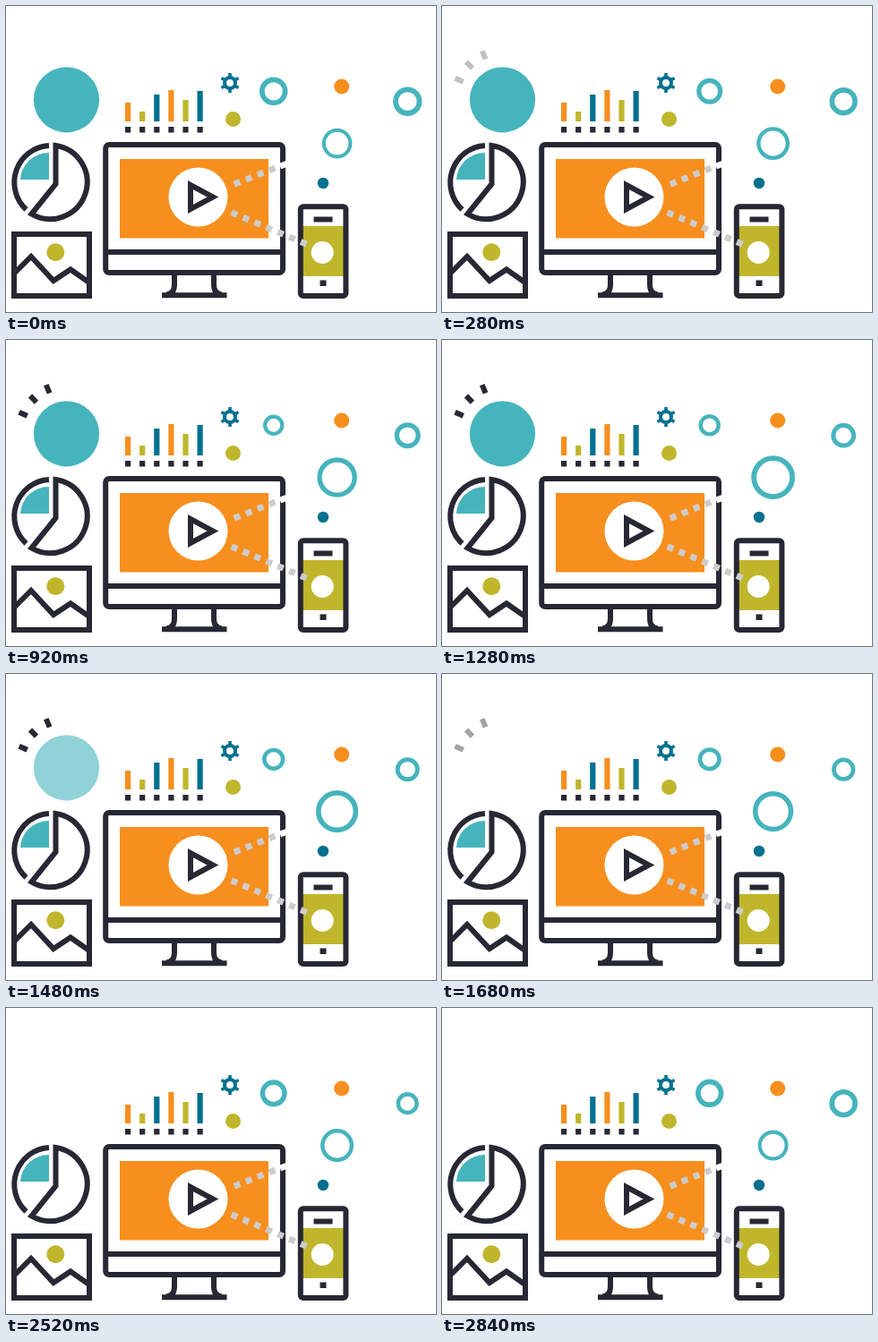
An HTML page for the animation above (2.88 s loop, 480 by 342 pixels).

```html
<!DOCTYPE html>
<html lang="en">
<head>
<meta charset="utf-8">
<title>Media devices</title>
<style>
  html, body { margin: 0; width: 100%; height: 100%; overflow: hidden; background: #fff; }
  svg { display: block; width: 100vw; height: 100vh; }
  .line { fill: none; stroke: var(--ink); stroke-width: 6; }
  .dots { fill: none; stroke: #ccc; stroke-width: 7; stroke-dasharray: 7 7; }
  .ring { fill: none; stroke: var(--teal); }
  svg { --ink: #272833; --teal: #46b4bd; --orange: #f78f1e; --olive: #c0b62c; --blue: #00708f; }
  .ink { fill: var(--ink); } .teal { fill: var(--teal); } .orange { fill: var(--orange); }
  .olive { fill: var(--olive); } .blue { fill: var(--blue); } .white { fill: #fff; }
</style>
</head>
<body>
<svg id="stage" viewBox="0 0 480 342">
  <!-- badge -->
  <circle id="badge" class="teal" cx="67.5" cy="104.8" r="36.6"/>
  <g id="sparks" class="ink"></g>

  <!-- bar chart and gear -->
  <g id="bars"></g>
  <g id="gear" stroke="var(--blue)" fill="none">
    <circle cx="250" cy="86" r="6" stroke-width="4"/>
  </g>

  <!-- loose dots -->
  <circle class="olive" cx="253.5" cy="126.5" r="8.5"/>
  <circle class="orange" cx="374.7" cy="90" r="8.5"/>
  <circle class="blue" cx="354" cy="198" r="6.2"/>

  <!-- pie chart -->
  <path class="teal" d="M48 164V194H16A32 31 0 0 1 48 164Z"/>
  <path class="line" d="M48 156A41.3 41.3 0 0 0 22.5 227.5"/>
  <path class="line" d="M55.5 156V199L28.5 232.5A41.3 41.3 0 1 0 55.5 156Z"/>

  <!-- picture -->
  <circle class="olive" cx="55.3" cy="275.3" r="10"/>
  <path class="line" d="M10 298L28 280L53 307L72 294.5L92 308.5"/>
  <rect class="line" x="9" y="255" width="84" height="69"/>

  <!-- monitor -->
  <rect class="line" x="111.2" y="155" width="197.8" height="143" rx="4"/>
  <path class="line" d="M111 275H309M188 300V311Q188 322 179 322.5M232 300V311Q232 322 241 322.5M174 323.3H246.5"/>
  <rect class="orange" x="127" y="171" width="166" height="88.5"/>
  <circle class="white" cx="214.5" cy="213.5" r="33"/>
  <path class="line" d="M206 200V227L231 213.5Z"/>

  <!-- phone -->
  <rect class="olive" x="330" y="246" width="49" height="56"/>
  <rect class="line" x="328.8" y="224.2" width="50.6" height="99.8" rx="3"/>
  <rect class="ink" x="343.5" y="235.5" width="21" height="6"/>
  <rect class="ink" x="350.5" y="306.5" width="7" height="6.5"/>
  <circle class="white" cx="353.2" cy="275.5" r="12.5"/>

  <!-- links -->
  <path class="dots" d="M254.8 199.2L300.5 181"/>
  <path d="M306 179L313 176.5" stroke="#fff" stroke-width="7"/>
  <path class="dots" d="M251.7 230.7L336 266.5"/>
</svg>
<script>
const LOOP = 2880, STEP = 40;
const $ = id => document.getElementById(id);

function add(parent, tag, attrs) {
  const el = document.createElementNS('http://www.w3.org/2000/svg', tag);
  for (const key in attrs) el.setAttribute(key, attrs[key]);
  parent.appendChild(el);
  return el;
}

// Bars: [top, colour]
[[108, 'orange'], [118, 'olive'], [99, 'blue'], [94, 'orange'], [105, 'olive'], [95, 'blue']]
  .forEach(([top, color], i) => {
    const x = 133 + i * 16.1;
    add($('bars'), 'rect', { class: color, x, y: top, width: 6.2, height: 129 - top });
    add($('bars'), 'rect', { class: 'ink', x, y: 135, width: 6.2, height: 6.5 });
  });

for (let a = 0; a < 360; a += 60)
  add($('gear'), 'path', { d: 'M250 75V80', 'stroke-width': 3.6, transform: `rotate(${a} 250 86)` });

[[19.2, 82.7, 24], [30.5, 66, 46], [46.7, 54.8, 67]].forEach(([x, y, a]) =>
  add($('sparks'), 'rect', {
    x: -5, y: -3, width: 10, height: 6, transform: `translate(${x} ${y}) rotate(${a})`
  }));

// Rings: outer radius over time, stroke as a share of that radius
const rings = [
  { x: 298.7, y: 95.3, weight: .36, keys: [[0, 15.8], [960, 11.5], [LOOP, 15.8]] },
  { x: 448.2, y: 106.7, weight: .36, keys: [[0, 16.2], [2440, 11.8], [LOOP, 16.2]] },
  { x: 369.6, y: 153.6, weight: .24, keys: [[0, 16.8], [1300, 24.5], [LOOP, 16.8]] }
];
for (const ring of rings)
  ring.el = add($('stage'), 'circle', { class: 'ring', cx: ring.x, cy: ring.y });

const fades = [
  { el: $('badge'), keys: [[0, 1], [1400, 1], [1600, 0], [LOOP, 0]] },
  { el: $('sparks'), keys: [[0, 0], [200, 0], [480, 1], [1520, 1], [1800, 0], [LOOP, 0]] }
];

function valueAt(keys, t) {
  const i = keys.findIndex(key => key[0] > t);
  const [t0, v0] = keys[i - 1], [t1, v1] = keys[i];
  return v0 + (v1 - v0) * (t - t0) / (t1 - t0);
}

function draw(t) {
  for (const { el, weight, keys } of rings) {
    const outer = valueAt(keys, t), width = outer * weight;
    el.setAttribute('r', outer - width / 2);
    el.setAttribute('stroke-width', width);
  }
  for (const { el, keys } of fades) el.setAttribute('opacity', valueAt(keys, t));
}

const start = performance.now();
function tick() {
  const t = Math.max(0, performance.now() - start) % LOOP;
  draw(Math.floor(t / STEP) * STEP);
  requestAnimationFrame(tick);
}
draw(0);
requestAnimationFrame(tick);
</script>
</body>
</html>
```
